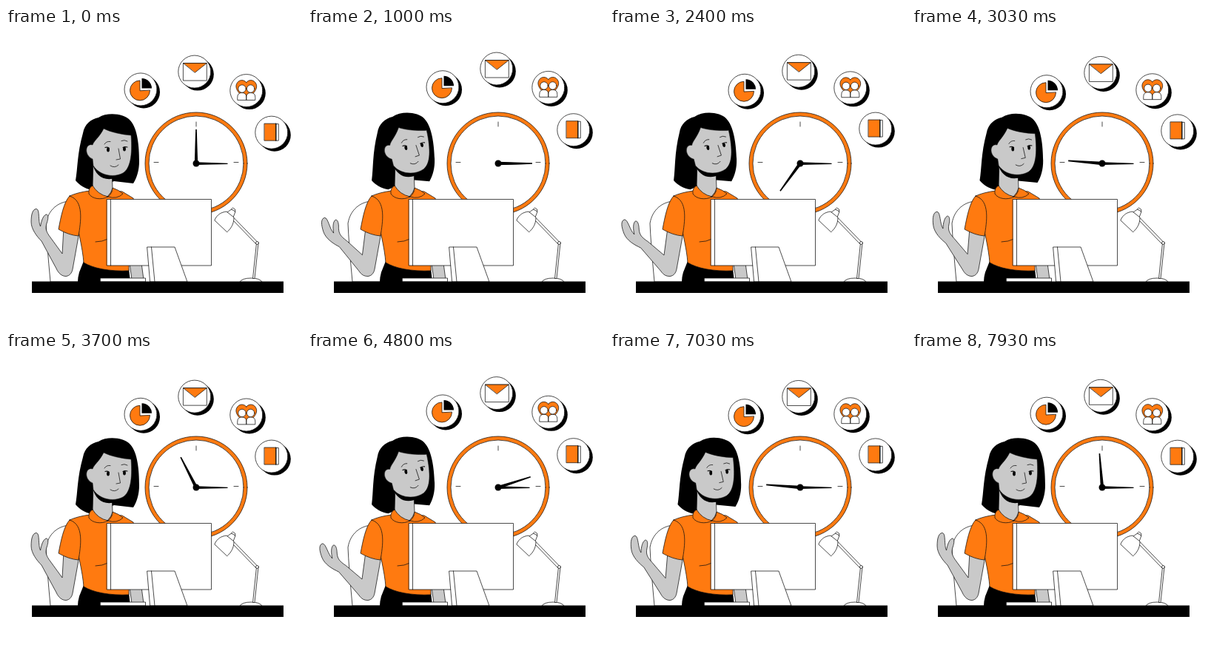
Animation, 400 px wide and 400 px high, one loop 8010 ms. Source, as an HTML page:

```html
<!DOCTYPE html>
<html lang="en">
<head>
<meta charset="utf-8">
<title>Time at the desk</title>
<style>
  html, body { margin: 0; width: 100%; height: 100%; overflow: hidden; background: #fff; }
  svg { display: block; width: 100vw; height: 100vh; }
  .w { fill: #fff; } .o { fill: #ff7a10; } .k { fill: #000; stroke: none; } .g { fill: #c9c9c9; }
  .n { fill: none; }
</style>
</head>
<body>
<svg viewBox="0 0 400 400" stroke="#111" stroke-width=".75" stroke-linejoin="round" stroke-linecap="round">
  <!-- clock -->
  <circle class="o" cx="257" cy="183" r="69"/>
  <circle class="w" cx="257" cy="183" r="64"/>
  <path class="n" d="M257 127v6M200 181.500h6M308 181.500h6"/>
  <path class="k" d="M257 181.200L299.500 182.800V184L257 185Z"/>
  <path class="k" id="hand" d="M254.800 183L256.200 137H257.800L259.200 183Z"/>
  <circle class="k" cx="257" cy="183" r="4.500"/>

  <!-- floating badges -->
  <g class="badge">
    <circle class="k" cx="4" cy="3.500" r="22"/><circle class="w" r="22"/>
    <path class="o" d="M-1 1.500V-12A13.500 13.500 0 1 0 12.500 1.500Z"/>
    <path class="k" d="M1.500 -1.500V-15A13.500 13.500 0 0 1 15 -1.500Z"/>
  </g>
  <g class="badge">
    <circle class="k" cx="4" cy="3.500" r="22"/><circle class="w" r="22"/>
    <path class="w" d="M-15 -11.500H16.500V12H-15Z"/>
    <path class="o" d="M-15 -11.500H16.500L.75 1Z"/>
  </g>
  <g class="badge">
    <circle class="k" cx="4" cy="3.500" r="22"/><circle class="w" r="22"/>
    <path class="o" d="M0 -11C-3 -15 -9 -15 -12 -11C-16 -6 -13 0 -9 4L0 12L9 4C13 0 16 -6 12 -11C9 -15 3 -15 0 -11Z"/>
    <path class="w" d="M-12 12.500V9Q-12 3 -6 3Q0 3 0 9V12.500ZM0 12.500V9Q0 3 6 3Q12 3 12 9V12.500Z"/>
    <circle class="w" cx="-5.800" cy="-2.500" r="5.200"/><circle class="w" cx="5.800" cy="-2.500" r="5.200"/>
  </g>
  <g class="badge">
    <circle class="k" cx="4" cy="3.500" r="22"/><circle class="w" r="22"/>
    <path class="w" d="M6 -11.500H9.500V11H6Z"/>
    <path class="o" d="M-9.500 -12H6V11H-9.500Z"/>
    <path class="n" d="M6 -12V11" stroke-width="1.200"/>
  </g>

  <!-- chair and body -->
  <path class="w" d="M86 234C70 235 57 246 54 264Q55 290 60 343H110V234Z"/>
  <path class="g" id="arm"/>
  <path class="g" d="M166 310L170 340H186L182 310Z"/>
  <path class="k" d="M105 315L99 330Q97 337 97 343H168L166 325Z"/>
  <path class="o" d="M113 220Q97 222 86 227L99 280Q104 303 105 317C118 325 140 329 166 328V318L180 260L172 230L157 221Z"/>
  <path class="o" d="M86 227C78 235 74 256 71 272Q85 280 98 281C101 262 106 233 86 227Z"/>
  <path class="n" d="M121 289Q130 289 138 285"/>

  <!-- head -->
  <path class="k" id="hair" d="M125 121C138 113 160 116 168 125C178 136 180 160 180 180C180 192 177 202 172 210L146 207L116 219C106 217 99 212 94 206C97 190 96 170 104 142C106 130 115 123 125 121Z"/>
  <path class="g" d="M118 180L117 215Q126 228 137 228Q143 222 144 216L143 192Z"/>
  <g id="face">
    <path class="k" d="M117 183C121 204 140 212 162 195Z"/>
    <path class="g" d="M132 136C126 148 119 152 117 158C107 155 105 172 117 177L118 186C126 199 145 203 158 196C168 190 171 172 169 145C157 144 142 141 132 136Z" stroke-width=".5"/>
    <path class="n" d="M133 157Q136 152.500 141 153.500M156 152.500Q160 150.500 164 153M152 163L154.500 177L149 178M141 186Q147 190 152 185"/>
    <path class="n" d="M134 161.500Q137 160.500 139.500 162.500M158 161.500Q161 160 164 161" stroke-width="1.100"/>
    <ellipse class="k" cx="138" cy="164.500" rx="1.900" ry="3"/>
    <ellipse class="k" cx="160" cy="163.500" rx="1.900" ry="3"/>
  </g>
  <path class="o" d="M117 213Q111 216 112 224C116 231 129 233 138 228Q124 225 117 213ZM138 228Q144 223 144 216Q153 219 158 224Q150 232 138 228Z"/>

  <!-- desk -->
  <path class="w" d="M136.500 231.500H277.500V321H136.500ZM141.500 231.500V321"/>
  <path class="w" d="M191 296H228L245 343H195ZM196.500 296L201 343"/>
  <path class="w" d="M127.500 338H188.500V343H127.500Z"/>
  <path class="w" d="M316 343Q319 338 331 338Q343 338 346 343Z"/>
  <path class="w" d="M338.500 291L333.500 338.500H336L341 291Z"/>
  <path class="w" d="M306 259L338 292L340 289.500L308.500 257Z"/>
  <circle class="w" cx="339.500" cy="290.500" r="2"/>
  <path class="w" d="M299 249L304.500 245L310 248L307 256Z"/>
  <path class="n" d="M304.500 245L306.500 243L310 245.500L309.500 248"/>
  <path class="w" d="M282 259.500C285 252 291 249 298 248L308 256C308 265 304 271 299 275.500Z"/>
  <rect class="k" x="35" y="342.500" width="340" height="15.500"/>
</svg>
<script>
const LOOP = 8010, SWAY = 4000;
const $ = id => document.getElementById(id);
const badges = [...document.querySelectorAll('.badge')];
// x, middle y, time of highest point
const floats = [[182, 82.7, 1050], [254.8, 57.7, 1300], [324.8, 82, 1650], [358.8, 138.2, 1900]];

const armKeys = [[0, 0], [800, 1], [1600, 0], [2400, 1], [3450, 0], [4000, 0]];
const headKeys = [[0, 0], [800, 1], [2400, 1], [3450, 0], [4000, 0]];

function ease(keys, t) {
  const i = keys.findIndex(k => t < k[0]);
  const [t0, v0] = keys[i - 1], [t1, v1] = keys[i];
  return v0 + (v1 - v0) * (1 - Math.cos(Math.PI * (t - t0) / (t1 - t0))) / 2;
}

function spin([x, y], [cx, cy], deg) {
  const a = deg * Math.PI / 180, c = Math.cos(a), s = Math.sin(a);
  return [cx + (x - cx) * c - (y - cy) * s, cy + (x - cx) * s + (y - cy) * c];
}

function armPath(v) {
  const elbow = [82, 325], wrist = [54, 285];
  const f = (x, y) => spin([x, y], elbow, -12.5 * v).map(n => n.toFixed(2)).join(' ');
  const h = (x, y) => f(...spin([x, y], wrist, -9 * v));
  return `M78 270L${76 - 3 * v} ${305 + 2 * v}L${f(60, 283)}` +
    `C${h(54, 275)} ${h(53, 271)} ${h(55, 264)}C${h(58, 256)} ${h(57, 251.5)} ${h(54, 252)}` +
    `C${h(50, 254)} ${h(48, 260)} ${h(46.5, 268)}C${h(43, 261)} ${h(46, 246)} ${h(41.5, 244.5)}` +
    `C${h(36, 244)} ${h(34, 252)} ${h(34, 262)}C${h(34, 272)} ${h(42, 282)} ${h(48, 288)}` +
    `L${f(68, 325)}C${f(71, 332)} 76 335.500 81 335.500C86 335 89 331 90 326L99 276Z`;
}

function draw(time) {
  // two pictures per 100 ms: at 0 and at 30
  const t = time % LOOP;
  const step = Math.min(159, 2 * Math.floor(t / 100) + (t % 100 >= 30 ? 1 : 0));
  const p = step * 50 % SWAY;
  const head = ease(headKeys, p);

  $('hand').setAttribute('transform', `rotate(${step * 4.5} 257 183)`);
  $('arm').setAttribute('d', armPath(ease(armKeys, p)));
  $('hair').setAttribute('transform', `translate(${-8 * head} ${-1.5 * head}) rotate(${-2 * head} 135 205)`);
  $('face').setAttribute('transform', `translate(0 ${-2.5 * head}) rotate(${-8 * head} 135 205)`);
  badges.forEach((b, i) => {
    const [x, y, top] = floats[i];
    const dy = -3 * Math.cos(2 * Math.PI * (p - top) / SWAY);
    b.setAttribute('transform', `translate(${x} ${y + dy})`);
  });
}

const start = performance.now();
function tick() {
  draw(performance.now() - start);
  requestAnimationFrame(tick);
}
tick();
</script>
</body>
</html>
```
